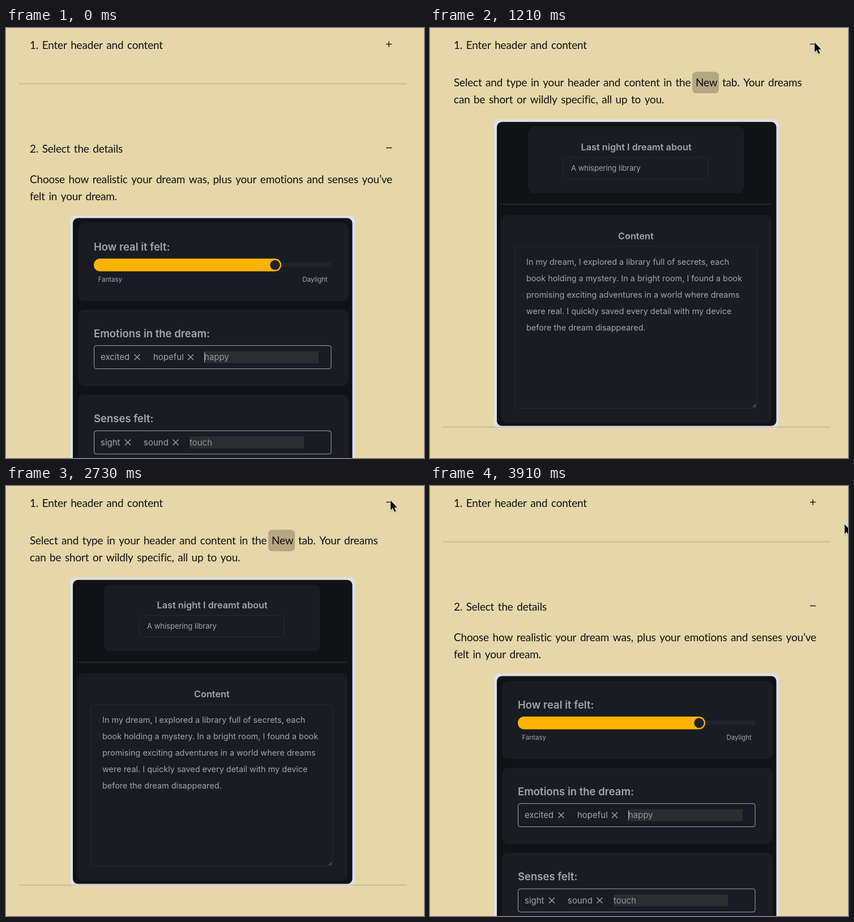
Recreate the animation shown at these times as an HTML page with a canvas. Size 738 by 759 pixels, loop 3.94 s.

```html
<!DOCTYPE html>
<html lang="en">
<head>
<meta charset="utf-8">
<style>
html, body { margin: 0; width: 100%; height: 100%; overflow: hidden; background: #e5d7a8; }
canvas { display: block; }
</style>
</head>
<body>
<canvas id="stage" width="738" height="759"></canvas>
<script>
const ctx = document.getElementById('stage').getContext('2d');
const LOOP = 3940, PAPER = '#e5d7a8', INK = '#13110d', GREY = '#a2a5ae';
const clamp = v => Math.max(0, Math.min(1, v));
const span = (t, a, b) => clamp((t - a) / (b - a));
const smooth = p => p * p * (3 - 2 * p);

function box(x, y, w, h, r, fill, stroke) {
  ctx.beginPath();
  ctx.roundRect(x, y, w, h, r);
  if (fill) { ctx.fillStyle = fill; ctx.fill(); }
  if (stroke) { ctx.strokeStyle = stroke; ctx.lineWidth = 1; ctx.stroke(); }
}

function body(str, x, y) {
  ctx.font = '19px Lato, sans-serif';
  ctx.letterSpacing = '-0.19px';
  ctx.wordSpacing = '1.9px';
  ctx.fillStyle = INK;
  ctx.fillText(str, x, y);
  ctx.letterSpacing = ctx.wordSpacing = '0px';
}

function ui(str, x, y, size, weight = 400, color = GREY) {
  ctx.font = `${weight} ${size}px Inter, sans-serif`;
  ctx.fillStyle = color;
  ctx.fillText(str, x, y);
}

function strokes(color, width, ...lines) {
  ctx.strokeStyle = color;
  ctx.lineWidth = width;
  ctx.beginPath();
  for (const [x1, y1, x2, y2] of lines) { ctx.moveTo(x1, y1); ctx.lineTo(x2, y2); }
  ctx.stroke();
}

function toggle(y, open) {
  strokes(INK, 1.4, [671, y, 681, y]);
  if (!open) strokes(INK, 1.4, [676, y - 5, 676, y + 5]);
}

function frame(y, h) {
  box(113, y, 503, h, 9, '#dfe1e5');
  box(118, y + 4.5, 493.5, h - 9, 9, '#111216');
}

function introText() {
  box(463, 65, 47, 38, 7, '#b4a883');
  body('Select and type in your header and content in the', 42, 91);
  body('New', 469, 91);
  body('tab. Your dreams', 516, 91);
  body('can be short or wildly specific, all up to you.', 42, 121);
}

const story = [
  'In my dream, I explored a library full of secrets, each',
  'book holding a mystery. In a bright room, I found a book',
  'promising exciting adventures in a world where dreams',
  'were real. I quickly saved every detail with my device',
  'before the dream disappeared.'
];

function editor() {
  frame(149, 545.5);
  box(173, 162, 382, 117, 11, '#191c22');
  ui('Last night I dreamt about', 266.5, 204, 16.3, 600);
  box(235.5, 216, 256, 38, 6, null, '#292c32');
  ui('A whispering library', 249, 240, 13);
  strokes('#25272c', 2, [125, 299, 602, 299]);
  box(125, 318, 478, 367, 11, '#191c22');
  ui('Content', 332, 360.5, 16.3, 600);
  box(150.5, 373.5, 426, 285.5, 5, null, '#292c32');
  story.forEach((s, i) => ui(s, 170, 406 + i * 28.85, 14.45));
  strokes('#8b8d93', 1, [570, 657, 575, 652], [573, 657, 575, 655]);
}

function cross(x, y) {
  strokes(GREY, 1.4, [x - 5, y - 5, x + 5, y + 5], [x + 5, y - 5, x - 5, y + 5]);
}

function field(title, top, tags, hint, hx) {
  ui(title, 155, top - 14.5, 18.5, 600);
  box(155.5, top + .5, 418.5, 41, 4, null, '#a3a5aa');
  for (const [word, x, cx] of tags) {
    ui(word, x, top + 26, 15);
    cross(cx, top + 21);
  }
  box(hx, top + 10.5, 202, 21, 0, '#2d2d2f');
  ui(hint, hx, top + 26, 15, 400, '#94959a');
}

function details() {
  body('Choose how realistic your dream was, plus your emotions and senses you’ve', 42, 274);
  body('felt in your dream.', 42, 303.5);
  frame(331, 560);
  box(127, 344, 478, 138, 12, '#191c22');
  box(127, 497, 478, 135, 12, '#191c22');
  box(127, 647, 478, 150, 12, '#191c22');
  ui('How real it felt:', 155, 393, 18.5, 600);
  box(470, 414, 105, 8, 4, '#22242b');
  box(155, 407, 331, 22.5, 11.25, '#ffb300');
  ctx.fillStyle = '#1f2126';
  ctx.beginPath();
  ctx.arc(475, 418.3, 8.7, 0, 7);
  ctx.fill();
  ui('Fantasy', 162.5, 448, 11.5);
  ui('Daylight', 523.5, 448, 11.5);
  field('Emotions in the dream:', 560, [['excited', 167, 231.5], ['hopeful', 260, 326]], 'happy', 350);
  strokes('#b0b1b5', 1, [350.5, 572, 350.5, 590]);
  field('Senses felt:', 710.5, [['sight', 167, 215], ['sound', 243, 299.5]], 'touch', 324);
}

function cursor(t) {
  const p = 1 - (1 - span(t, 30, 480)) ** 2;
  ctx.save();
  ctx.translate(731.5 - 53 * p, 67 - 42 * p);
  ctx.shadowColor = 'rgba(0,0,0,.25)';
  ctx.shadowBlur = 2;
  ctx.shadowOffsetY = 1;
  const tip = new Path2D('M.5 .5V17.5L4.3 14L7.3 20.6L10 19.4L7.2 12.7H12.2Z');
  ctx.fillStyle = '#000';
  ctx.strokeStyle = '#fff';
  ctx.lineWidth = 1.6;
  ctx.stroke(tip);
  ctx.shadowColor = 'transparent';
  ctx.fill(tip);
  ctx.restore();
}

function faded(alpha, draw) {
  if (alpha <= 0) return;
  ctx.save();
  ctx.globalAlpha = alpha;
  draw();
  ctx.restore();
}

function draw(time) {
  // The second half of the loop runs backwards.
  const t = Math.min(time, LOOP - time);
  const swapped = t >= 700, grown = t >= 1130;
  const lag = grown ? 1 - smooth(span(t, 1210, 1500)) : 0;
  const rule = grown ? 744 - 39.5 * lag : 98.5;
  const drop = rule - 98.5;

  ctx.fillStyle = PAPER;
  ctx.fillRect(0, 0, 738, 759);
  body('1. Enter header and content', 42, 37);
  toggle(28.5, swapped);

  ctx.save();
  ctx.translate(0, drop);
  body('2. Select the details', 42, 219.5);
  toggle(211.5, !swapped);
  ctx.restore();
  faded(1 - span(t, 700, 880), details);

  ctx.save();
  ctx.translate(0, 12.3 * lag);
  faded(span(t, 760, 940), introText);
  if (grown) editor();
  ctx.restore();
  strokes('rgba(120,100,60,.24)', 2.2, [23, rule, 707, rule]);

  if (time >= 30) cursor(t);
}

function tick() {
  draw(performance.now() % LOOP);
  requestAnimationFrame(tick);
}
tick();
</script>
</body>
</html>
```
